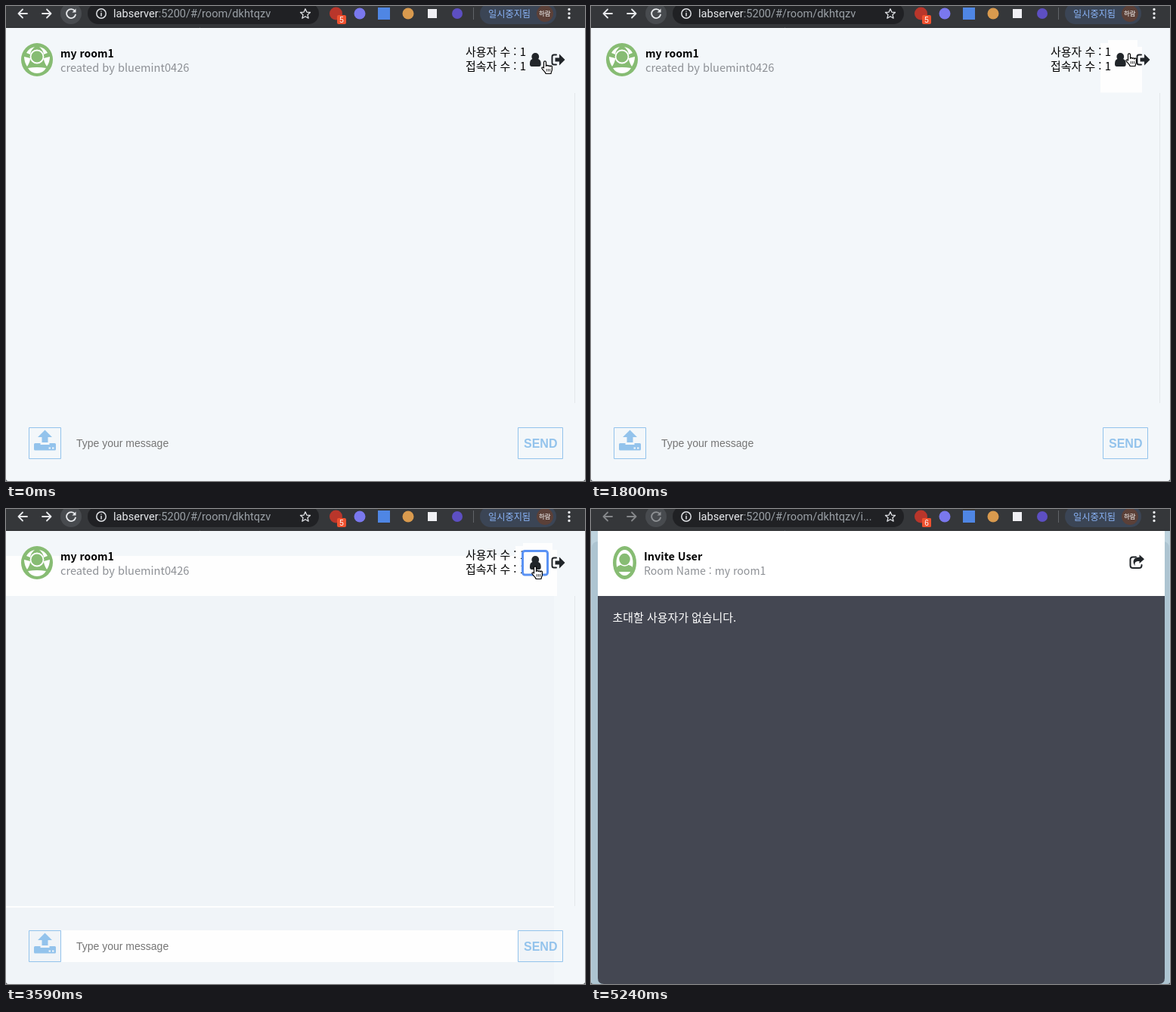
An HTML page for the animation above (5.34 s loop, 766x628 px).

```html
<!DOCTYPE html>
<html lang="ko">
<head>
<meta charset="utf-8">
<title>Chat room</title>
<style>
html, body { margin: 0; width: 100%; height: 100%; overflow: hidden; background: #f3f7fa; }
svg { display: block; width: 766px; height: 628px; }
text { font-family: "Noto Sans CJK KR", "Noto Sans KR", "Noto Sans CJK JP", "Noto Sans CJK", sans-serif; font-variant-ligatures: no-contextual; white-space: pre; }
.url { font: 14.6px Roboto, sans-serif; }
.arial { font-family: "Liberation Sans", Arial, sans-serif; }
.bold { font-weight: 600; }
.sub { font-weight: 300; fill: #8d9095; }
.ko { font-size: 14.95px; }
.line { fill: none; stroke-linecap: round; stroke-linejoin: round; }

.anim { animation: 5340ms step-end infinite; }
.patch { animation-name: patch; }
.block { animation-name: block; }
.wash { animation-name: wash; }
.focus { animation-name: focus; }
.invite { animation-name: invite; }
.fwd { animation-name: fwd; }
.idle { animation-name: idle; }
.hand { animation-name: hand; }
.arrow { animation-name: arrow; }

@keyframes patch { from { opacity: 0 } 5.617% { opacity: 1 } }
@keyframes block { from { opacity: 0 } 30.898% { opacity: 1 } }
@keyframes wash { from { opacity: 0 } 39.325% { opacity: 1 } }
@keyframes focus { from { opacity: 0 } 67.228% { opacity: 1 } }
@keyframes invite { from { opacity: 0; fill-opacity: 0 } 70.037% { opacity: 1; fill-opacity: 1 } }
@keyframes fwd { from { opacity: 1 } 70.037%, to { opacity: .45 } }
@keyframes idle { from { opacity: 1 } 98.127%, to { opacity: .45 } }
@keyframes hand {
  from { transform: translate(708px, 72px) }
  2.808% { transform: translate(706px, 80px) }
  5.617% { transform: translate(696px, 87px) }
  8.426% { transform: translate(686px, 76px) }
  11.235% { transform: translate(686px, 61px) }
  14.044% { transform: translate(684px, 55px) }
  16.853% { transform: translate(696px, 53px) }
  19.662% { transform: translate(708px, 58px) }
  22.471% { transform: translate(713px, 66px) }
  25.28% { transform: translate(710px, 82px) }
  28.089% { transform: translate(698px, 92px) }
  30.898% { transform: translate(700px, 76px) }
  33.707% { transform: translate(707px, 62px) }
  36.516% { transform: translate(708px, 55px) }
  39.325% { transform: translate(706px, 66px) }
  42.134% { transform: translate(706px, 76px) }
  44.943% { transform: translate(704px, 77px) }
  47.752% { transform: translate(700px, 78px) }
  50.561% { transform: translate(697px, 77px) }
  53.37% { transform: translate(695px, 75px); opacity: 1 }
  70.037%, to { transform: translate(695px, 75px); opacity: 0 }
}
@keyframes arrow {
  from { transform: translate(699px, 75px); opacity: 0 }
  70.037% { transform: translate(699px, 75px); opacity: 1 }
  78.464% { transform: translate(707px, 95px); opacity: 1 }
  81.273% { transform: translate(724px, 170px); opacity: 1 }
  84.082% { transform: translate(737px, 270px); opacity: 1 }
  86.891% { transform: translate(739px, 380px); opacity: 1 }
  89.7% { transform: translate(728px, 490px); opacity: 1 }
  92.509% { transform: translate(707px, 606px); opacity: 1 }
  98.127%, to { transform: translate(707px, 606px); opacity: 0 }
}
</style>
</head>
<body>
<svg viewBox="0 0 766 628">
  <!-- chat room -->
  <g>
    <rect width="766" height="628" fill="#f3f7fa"/>
    <path class="anim patch" d="M680 80H724V107.500H680z" fill="#fdfdfe"/>
    <g class="anim wash">
      <path d="M0 62H729V115H0z" fill="#fefefe"/>
      <path d="M0 115H725V628H0z" fill="#f0f4f8"/>
      <path d="M0 525H725V527H0zM73 557H677V599H73z" fill="#fefefe"/>
    </g>
    <path class="anim block" d="M674 49H684V45H723V54H729V114.500H674z" fill="#fefefe"/>
    <path d="M752.500 115V525" stroke="#e4e8eb"/>

    <g transform="translate(41 71)">
      <ellipse rx="21" ry="22" fill="#87bc73"/>
      <g fill="#fff">
        <path d="M-14-9Q-10-16-3-17Q-8-13-9-7zM14-9Q10-16 3-17Q8-13 9-7z"/>
        <path d="M-17-4L-9-2Q-9 3-13 9Q-17 3-17-4zM17-4L9-2Q9 3 13 9Q17 3 17-4z"/>
        <path d="M-12 11Q0 9 12 11Q8 18 0 18T-12 11z"/>
      </g>
      <circle cy="-4" r="8.500" fill="#87bc73" stroke="#fff" stroke-width="1.800"/>
    </g>
    <text class="bold" x="72" y="68" font-size="14">my room1</text>
    <text class="sub" x="72" y="87" font-size="14.600">created by bluemint0426</text>
    <text class="ko" x="608" y="65.500">사용자 수 : 1</text>
    <text class="ko" x="608" y="84.500">접속자 수 : 1</text>

    <rect class="anim focus" x="683.500" y="55.500" width="33" height="31.500" rx="3" fill="#fdfdfe" stroke="#5a92f4" stroke-width="3"/>
    <g fill="#212529">
      <path d="M693 77c0-5 1.500-7 4.500-7h5.500c3 0 4.700 2 4.700 7q0 3-2.500 3h-9.700q-2.500 0-2.500-3z"/>
      <circle cx="700.300" cy="67" r="4.900"/>
    </g>
    <path class="line" d="M728 64.500H725q-2.500 0-2.500 2.500v8q0 2.500 2.500 2.500h3" stroke="#212529" stroke-width="2"/>
    <path d="M726.500 68.500h5.500v-5l7.500 7.500-7.500 7.500v-5h-5.500z" fill="#212529"/>

    <g fill="none" stroke="#93c3ec">
      <path d="M30.500 557.500h42v41h-42zM677.500 557.500h59v41h-59z"/>
    </g>
    <g fill="#93c3ec">
      <path d="M51.500 560.500l9.500 9.500h-5.500v7h-8v-7h-5.500z"/>
      <path d="M38.500 578h7v2h12v-2h7q1.500 0 1.500 1.500v6.500q0 1.500-1.500 1.500h-26q-1.500 0-1.500-1.500v-6.500q0-1.500 1.500-1.500z"/>
      <text class="arial" x="685" y="584" font-size="16" font-weight="700">SEND</text>
    </g>
    <path d="M56.500 583.500h2.500v2h-2.500zM61 583.500h2.500v2h-2.500z" fill="#f3f7fa"/>
    <text class="arial" x="93" y="583" font-size="14" fill="#757575">Type your message</text>
    <path d="M0 625q0 3 3 3H0zM766 625q0 3-3 3h3z" fill="#43474b"/>
  </g>

  <!-- invite page -->
  <g class="anim invite">
    <rect y="28" width="766" height="600" fill="#bed3de"/>
    <rect x="1" y="43" width="764" height="600" rx="8" fill="#adc4d1"/>
    <path d="M9 29H759V115H9z" fill="#fff"/>
    <path d="M9 115H759V620q0 8-8 8H17q-8 0-8-8z" fill="#444752"/>
    <g transform="translate(44.500 71)">
      <ellipse rx="15.500" ry="22" fill="#87bc73"/>
      <ellipse rx="11" ry="17" fill="#fff"/>
      <path d="M-11.500 12V9C-11 4-6 2.500 0 2.500S11 4 11.500 9v3z" fill="#87bc73"/>
      <ellipse cy="-4.500" rx="8" ry="8.500" fill="#87bc73" stroke="#fff" stroke-width="1.500"/>
    </g>
    <text class="bold" x="70" y="68" font-size="14.400">Invite User</text>
    <text class="sub" x="70" y="87" font-size="14.100">Room Name : my room1</text>
    <text class="ko" x="28.500" y="148.500" fill="#fff">초대할 사용자가 없습니다.</text>
    <path class="line" d="M721 63.500H717q-3.500 0-3.500 3.500v7.500q0 3.500 3.500 3.500h8q3.500 0 3.500-3.500V74" stroke="#212529" stroke-width="2"/>
    <path d="M725.500 60.500l6.500 5.800-6.500 5.800v-3.200c-5 0-6.800 1.300-5.700 6.300-4.200-5-2.700-11.500 5.700-11.500z" fill="#212529"/>
    <path d="M0 625q0 3 3 3H0zM766 625q0 3-3 3h3z" fill="#43474b"/>
  </g>

  <!-- browser bar -->
  <rect width="766" height="28.500" fill="#35373a"/>
  <path d="M0 28.500H766" stroke="#292b2e"/>
  <g class="line" stroke="#e8eaed" stroke-width="1.800">
    <path class="anim idle" d="M28 10H16.500M22 4.500L16.500 10L22 15.500"/>
    <path class="anim fwd" d="M48 10H59.500M54 4.500L59.500 10L54 15.500"/>
    <circle cx="86" cy="10" r="14" fill="#484b4f" stroke="none"/>
    <g class="anim idle">
      <path d="M91 6.500A6 6 0 1 0 92 11.500"/>
      <path d="M92.500 3.500v5h-5z" fill="#e8eaed" stroke="none"/>
    </g>
  </g>
  <rect x="108" y="-4" width="306" height="28" rx="14" fill="#202124"/>
  <g class="line" stroke="#dfe1e5" stroke-width="1.500">
    <circle cx="126" cy="10" r="6.200"/>
    <path d="M126 9.500v3.500M126 7v.1"/>
    <path d="M396 3.800l1.900 4.300 4.600.4-3.500 3.100 1.100 4.600-4.100-2.500-4.100 2.500 1.100-4.600-3.500-3.100 4.600-.4z" stroke-width="1.300"/>
  </g>
  <text class="url" x="142" y="15" fill="#9aa0a6"><tspan fill="#e8eaed">labserver</tspan>:5200/#/room/dkhtqzv<tspan class="anim invite">/i...</tspan></text>

  <circle cx="436.500" cy="10" r="8.500" fill="#b9362b"/>
  <rect x="438" y="12" width="12" height="12" rx="2" fill="#ee512f"/>
  <text class="arial" x="441.200" y="22" font-size="10" fill="#fff">5</text>
  <g class="anim invite">
    <rect x="438" y="12" width="12" height="12" rx="2" fill="#ee512f"/>
    <text class="arial" x="441.200" y="22" font-size="10" fill="#fff">6</text>
  </g>
  <circle cx="468" cy="10" r="7.500" fill="#7a78ee"/>
  <rect x="492" y="2" width="16" height="16" fill="#4f86e4"/>
  <circle cx="532" cy="10" r="7.500" fill="#d99a4e"/>
  <rect x="558" y="4" width="12" height="12" fill="#f0f0f4"/>
  <circle cx="597" cy="10" r="7" fill="#5d4fc2"/>
  <path d="M618.500 2V18" stroke="#606468"/>
  <rect x="627" y="-4" width="101" height="28" rx="14" fill="#3b4555"/>
  <text x="638" y="14.500" font-size="12.200" fill="#8ab4f8">일시중지됨</text>
  <circle cx="713" cy="10" r="11" fill="#5b4038"/>
  <text x="705" y="13" font-size="8.500" fill="#fff">하람</text>
  <path class="line" d="M745 4.500v.1M745 10v.1M745 15.500v.1" stroke="#e8eaed" stroke-width="3.400"/>

  <!-- pointers -->
  <g class="anim hand" stroke="#000" stroke-width="1.200" stroke-linejoin="round">
    <path d="M3.500 10V2.400a1.500 1.500 0 0 1 3 0V7.500a1.400 1.400 0 0 1 2.700 0a1.400 1.400 0 0 1 2.600.6a1.300 1.300 0 0 1 2.600.7V12c0 2-1.400 3-1.400 5.500H6.200C5.500 15 3 13.500 1.200 10.800c-1-1.600.9-2.600 2.300-.8z" fill="#fff"/>
    <path d="M7.200 11v3.500M9.400 11v3.500M11.600 11v3.500" stroke-width=".8"/>
  </g>
  <path class="anim arrow" d="M1 1V14.200L4 11.400L6 16.200L8.300 15.200L6.300 10.600H10.500z" stroke="#fff" stroke-width="1.200" stroke-linejoin="round"/>
</svg>
</body>
</html>
```
